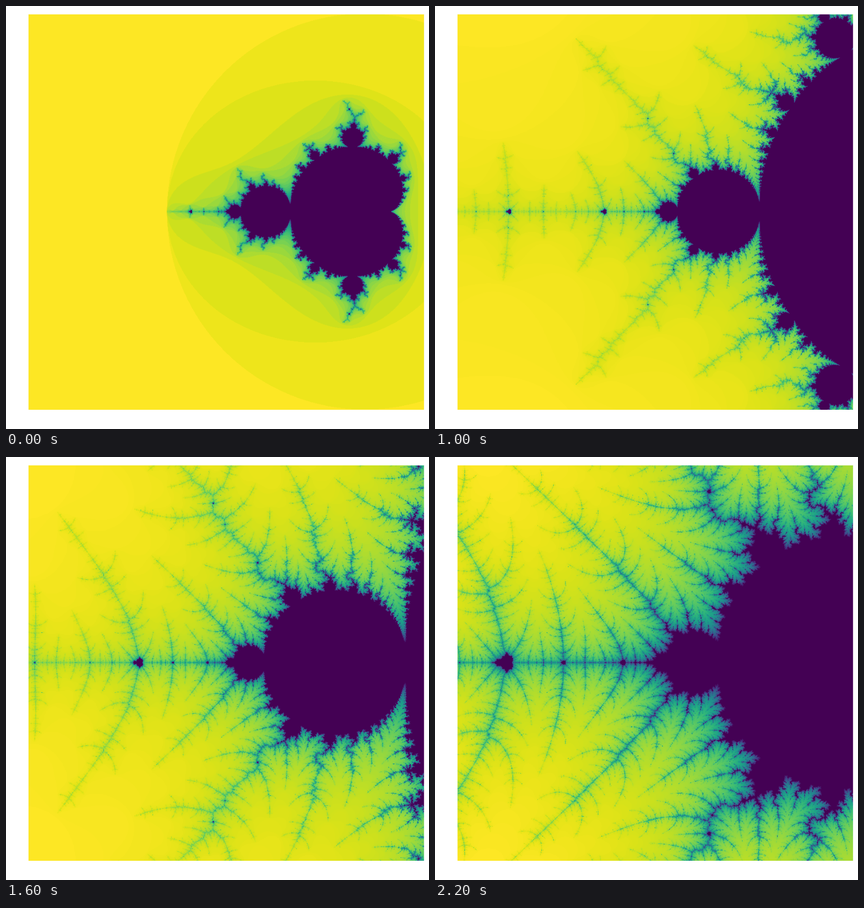
Write a matplotlib script that moves like this. It is 748 px wide and 748 px high and loops after 2.4 s.

```python
from functools import lru_cache

import numpy as np
import matplotlib.pyplot as plt
from matplotlib.animation import FuncAnimation

STAGE = 748
LEFT, BOTTOM, SIDE = 39.1, 34.1, 700.2   # axes box in pixels
N = 800                                  # samples per side
FRAMES = 12
CENTER = -1.401155                       # limit of the period doublings


def escape_counts(c, limit):
    """Steps each point stays within radius 2, at most `limit`."""
    counts = np.zeros(c.size)
    q = (c.real - 0.25) ** 2 + c.imag ** 2
    inside = q * (q + c.real - 0.25) <= 0.25 * c.imag ** 2
    inside |= (c.real + 1) ** 2 + c.imag ** 2 <= 0.0625
    counts[inside] = limit

    where = np.flatnonzero(~inside)
    c = c[where]
    z = np.zeros_like(c)
    n = np.zeros(c.size)
    for step in range(1, limit + 1):
        z *= z
        z += c
        alive = z.real ** 2 + z.imag ** 2 <= 4
        n += alive
        if step % 8 == 0 or step == limit:
            counts[where] = n
            where, c, z, n = where[alive], c[alive], z[alive], n[alive]
            if not where.size:
                break
    return counts


@lru_cache(maxsize=None)
def mandelbrot(k):
    half = 2 / 2 ** k
    limit = 40 + 50 * max(k - 1, 0)
    axis = np.linspace(-half, half, N)
    x, y = CENTER + axis, axis[N // 2:]
    with np.errstate(all="ignore"):
        blocks = [escape_counts((x + 1j * rows[:, None]).ravel(), limit)
                  for rows in np.array_split(y, 20)]
    upper = np.concatenate(blocks).reshape(-1, N)
    return np.vstack([upper[::-1], upper])   # mirrored in the real axis


fig = plt.figure(figsize=(8.5, 8.5), dpi=88, facecolor="white")
ax = fig.add_axes([LEFT / STAGE, BOTTOM / STAGE, SIDE / STAGE, SIDE / STAGE])
ax.set(xticks=[], yticks=[])
ax.spines[:].set(color="white", linewidth=0.8 * 72 / fig.dpi)
image = ax.imshow(mandelbrot(0), cmap="viridis_r", aspect="auto",
                  interpolation="antialiased")


def update(k):
    counts = mandelbrot(k)
    image.set_data(counts)
    image.set_clim(counts.min(), counts.max())
    return [image]


anim = FuncAnimation(fig, update, frames=FRAMES, interval=200,
                     repeat=True, repeat_delay=0)
plt.show()
```
